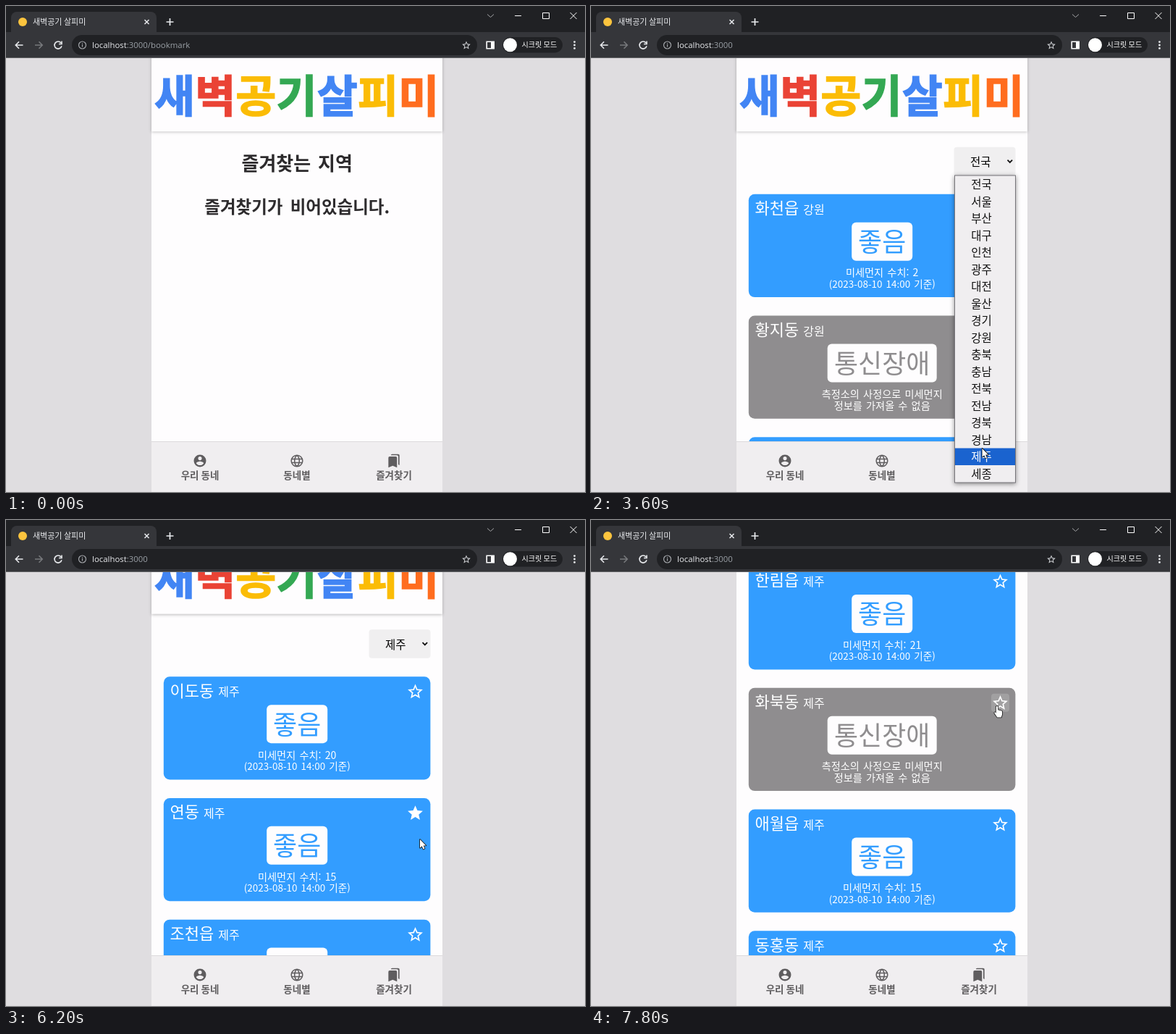
An HTML page with a canvas for the animation above (8 s loop, 800 by 671 pixels).

```html
<!DOCTYPE html>
<html lang="ko">
<head>
<meta charset="utf-8">
<title>새벽공기 살피미</title>
<style>
html, body { margin: 0; width: 100%; height: 100%; overflow: hidden; background: #dfdde0; }
canvas { display: block; width: 100vw; height: 100vh; }
</style>
</head>
<body>
<canvas id="stage" width="800" height="671"></canvas>
<script>
const ctx = document.getElementById('stage').getContext('2d');
const LOOP = 8000, STEP = 100;
const KR = '"Noto Sans CJK KR", "Noto Sans CJK", sans-serif';
const UI = '"Open Sans", "Noto Sans", sans-serif';
const BLUE = '#339dff', GREY = '#8f8d8f', WHITE = '#fefdfe', DARK = '#202124', BAR = '#35363a', LIGHT = '#e8eaed';
const COLUMN = { x: 201, w: 402, mid: 402.2 };
const CARD = { x: 217.8, y: 259.8, w: 368.6, h: 142.3, gap: 167.7 };
const MENU = { x: 503, y: 234.4, row: 23.5 };

const APP = '새벽공기 살피미';
const LOGO_COLORS = ['#4285f4', '#ea4335', '#fbbc05', '#34a853', '#4285f4', '#fbbc05', '#ff6d1f'];
const REGIONS = '전국 서울 부산 대구 인천 광주 대전 울산 경기 강원 충북 충남 전북 전남 경북 경남 제주 세종'.split(' ');
const ALL = [['화천읍', 2], ['황지동', null], ['중앙동', 5]];
const JEJU = [['이도동', 20], ['연동', 15], ['조천읍', 27], ['한림읍', 21], ['화북동', null], ['애월읍', 15], ['동홍동', 18]];
const NAV = [['person', '우리 동네'], ['globe', '동네별'], ['marks', '즐겨찾기']];
const navX = i => 268 + i * 134;

// Clicks, in ms
const SHOW_LIST = 800, OPEN_MENU = 2400, PICK = 4000, MARK = 5300;
// Pointer moves: start, duration, then where to
const MOVES = [
  [100, 500, 407, 640], [1500, 600, 515, 243], [2200, 500, 525, 231], [2700, 800, 540, 607],
  [3500, 300, 542, 622], [4800, 500, 562, 441], [5400, 100, 572, 441],
  [6200, 300, 574, 448], [6500, 900, 561, 257]
];

const ICON = {
  starEdge: 'M22 9.24l-7.19-.62L12 2 9.19 8.63 2 9.24l5.46 4.73L5.82 21 12 17.27 18.18 21l-1.63-7.03zM12 15.4l-3.76 2.27 1-4.28-3.32-2.88 4.38-.38L12 6.1l1.71 4.04 4.38.38-3.32 2.88 1 4.28z',
  star: 'M12 17.27L18.18 21l-1.63-7.03L22 9.24l-7.19-.62L12 2 9.19 8.63 2 9.24l5.46 4.73L5.82 21z',
  person: 'M12 2a10 10 0 100 20 10 10 0 000-20zM12 5a3 3 0 110 6 3 3 0 010-6zM12 19.2c-2.5 0-4.7-1.3-6-3.2 0-2 4-3.1 6-3.1s6 1.1 6 3.1c-1.3 1.9-3.5 3.2-6 3.2z',
  marks: 'M19 18l2 1V3a2 2 0 00-2-2H9a2 2 0 00-2 2h10a2 2 0 012 2zM15 5H5a2 2 0 00-2 2v16l7-3 7 3V7a2 2 0 00-2-2z',
  globe: 'M12 2.8a9.2 9.2 0 100 18.4 9.2 9.2 0 000-18.4zM12 2.8c-5.2 5-5.2 13.4 0 18.4M12 2.8c5.2 5 5.2 13.4 0 18.4M3.6 9h16.8M3.6 15h16.8',
  hand: 'M-1.3 10V1.2a1.3 1.3 0 012.6 0V5.3l4.4 1a1.7 1.7 0 011.4 1.7v3.4l-1.3 4H.3L-3.6 9.7a1 1 0 011.5-1.2z',
  arrow: 'M0 0V11.8l2.7-2.5 1.8 4.2 2-.9-1.8-4.1h3.6z'
};
for (const k in ICON) ICON[k] = new Path2D(ICON[k]);

const progress = (t, start, length) => Math.min(1, Math.max(0, (t - start) / length));
const inside = (p, x, y, w, h) => p.x >= x && p.x <= x + w && p.y >= y && p.y <= y + h;
const menuOpen = t => t >= OPEN_MENU && t < PICK;
const cardsAt = t => t < SHOW_LIST ? [] : t < PICK ? ALL : JEJU;
const cardY = i => CARD.y + i * CARD.gap;

function pointerAt(t) {
  let x = 424, y = 680;
  for (const [start, length, toX, toY] of MOVES) {
    const u = progress(t, start, length), e = u * u * (3 - 2 * u);
    x += (toX - x) * e;
    y += (toY - y) * e;
  }
  return { x, y };
}

// Wheel scroll: quick start, long glide
const scrollAt = t => 698.8 * (1 - (1 - progress(t, 6100, 900) ** 2.16) ** 7.38);

function navAt(t) {
  const p = pointerAt(t);
  return menuOpen(t) ? -1 : NAV.findIndex((_, i) => inside(p, navX(i) - 40, 612, 80, 59));
}

function starAt(t) {
  const p = pointerAt(t), scroll = scrollAt(t);
  return cardsAt(t).findIndex((_, i) => inside(p, 553, cardY(i) + 8 - scroll, 25, 25));
}

function rect(x, y, w, h, color, r = 0) {
  ctx.fillStyle = color;
  ctx.beginPath();
  ctx.roundRect(x, y, w, h, r);
  ctx.fill();
}

function dot(x, y, r, color) {
  ctx.fillStyle = color;
  ctx.beginPath();
  ctx.arc(x, y, r, 0, 7);
  ctx.fill();
}

// Text centred vertically on cy; returns its width
function text(s, x, cy, size, color, { align = 'left', weight = 400, font = KR, gap = 0 } = {}) {
  ctx.font = `${weight} ${size}px ${font}`;
  ctx.wordSpacing = gap + 'px';
  ctx.textAlign = align;
  ctx.fillStyle = color;
  ctx.fillText(s, x, cy + size * 0.38);
  return ctx.measureText(s).width;
}

function line(d, color, width = 1.4) {
  ctx.strokeStyle = color;
  ctx.lineWidth = width;
  ctx.stroke(new Path2D(d));
}

function icon(name, cx, cy, size, color, outlined) {
  ctx.save();
  ctx.translate(cx - size / 2, cy - size / 2);
  ctx.scale(size / 24, size / 24);
  ctx.fillStyle = ctx.strokeStyle = color;
  ctx.lineWidth = 1.8;
  if (outlined) ctx.stroke(ICON[name]);
  else ctx.fill(ICON[name], 'evenodd');
  ctx.restore();
}

function shadow(blur, alpha, dy = 0) {
  ctx.shadowColor = `rgba(0,0,0,${alpha})`;
  ctx.shadowBlur = blur;
  ctx.shadowOffsetY = dy;
}

function drawBrowser(t) {
  rect(0, 0, 800, 36, DARK);
  rect(7, 8, 201, 30, BAR, [8, 8, 0, 0]);
  rect(0, 36, 800, 36, BAR);
  rect(0, 71, 800, 1, '#66676a');
  dot(23, 22, 6, '#fcc43e');
  text(APP, 37, 21.5, 11, LIGHT, { weight: 500 });
  line('M191.5 19l6 6m0-6l-6 6', LIGHT, 1.5);
  line('M221.5 22h10m-5-5v10', LIGHT, 1.7);
  line('M665 11.5l4.5 4 4.5-4', '#a5a6a8', 1);
  line('M703 13.5h9M741.5 9.5h9v8h-9zM779.5 9l9 9m0-9l-9 9', '#fff', 1);

  line('M23.5 54h-10m4.5-4.7l-4.7 4.7 4.7 4.7', LIGHT, 1.6);
  line('M40 54h10m-4.5-4.7l4.7 4.7-4.7 4.7', '#77797c', 1.6);
  line('M76 51a5 5 0 10.9 4.2M77 48.5v4h-4', LIGHT, 1.6);
  rect(91, 40, 560, 28, DARK, 14);
  line('M110.5 54a5 5 0 11-10 0a5 5 0 0110 0M105.5 53.3v3.2M105.5 51.2v1.2', '#a5a8ac', 1.2);
  const url = { font: UI };
  const w = text('localhost', 119, 54, 11.4, LIGHT, url);
  text(':3000' + (t < SHOW_LIST ? '/bookmark' : ''), 119 + w, 54, 11.4, '#9aa0a6', url);
  icon('starEdge', 636, 54.3, 14, '#d5d7da');
  line('M664.2 49.2h10v9.6h-10z', '#fff', 1.6);
  rect(670, 49, 4.5, 10, '#fff');
  rect(686, 43, 83, 21.5, DARK, 11);
  dot(696.5, 53.7, 9.5, '#fff');
  text('시크릿 모드', 712.5, 53.3, 10.1, '#fff');
  for (let i = -1; i < 2; i++) dot(785.5, 54 + i * 4.4, 1.4, LIGHT);
}

function drawHeader() {
  ctx.save();
  shadow(4, 0.25, 1);
  rect(COLUMN.x, 60, COLUMN.w, 113.3, WHITE);
  ctx.restore();
  [...APP.replace(' ', '')].forEach((ch, i) => {
    const x = 233 + i * 56.2, color = LOGO_COLORS[i];
    text(ch, x, 123.5, 61, color, { align: 'center', weight: 900 });
    ctx.strokeStyle = color;
    ctx.lineWidth = 1.5;
    ctx.strokeText(ch, x, 123.5 + 61 * 0.38);
  });
}

function drawSelect(label) {
  rect(501.5, 194.8, 85, 39.5, '#f0eff0', 4);
  text(label, 524, 215.5, 15.5, '#000');
  line('M575.5 212.7l3.3 3.3 3.3-3.3', '#111', 1.8);
}

function drawCard([name, value], region, y, starred, hovered) {
  const down = value === null, color = down ? GREY : BLUE, mid = COLUMN.mid;
  const center = { align: 'center', gap: 2 };
  rect(CARD.x, y, CARD.w, CARD.h, color, 8.4);
  const w = text(name, 226.5, y + 19, 22, '#fff');
  text(region, 226.5 + w + 6, y + 21, 16, '#fff');
  const badge = down ? 151 : 84;
  rect(mid - badge / 2, y + 38.9, badge, 53, WHITE, 6);
  text(down ? '통신장애' : '좋음', mid, y + 65.7, 36, color, center);
  text(down ? '측정소의 사정으로 미세먼지' : '미세먼지 수치: ' + value, mid, y + 108.2, 14.2, '#fff', center);
  text(down ? '정보를 가져올 수 없음' : '(2023-08-10 14:00 기준)', mid, y + 124, down ? 14.2 : 13.5, '#fff', center);
  if (hovered) rect(553, y + 8, 25, 25, 'rgba(255,255,255,.17)', 4);
  icon(starred ? 'star' : 'starEdge', 565.5, y + 20.7, 25, '#fff');
}

function drawPage(t) {
  const jeju = t >= PICK, hover = starAt(t);
  ctx.save();
  ctx.beginPath();
  ctx.rect(0, 72, 800, 599);
  ctx.clip();
  rect(0, 72, 800, 599, '#dfdde0');
  rect(COLUMN.x, 60, COLUMN.w, 630, WHITE);
  ctx.translate(0, -scrollAt(t));
  drawHeader();
  if (t < SHOW_LIST) {
    text('즐겨찾는 지역', COLUMN.mid, 217, 26, '#2d2b2d', { align: 'center', weight: 900, gap: 4 });
    text('즐겨찾기가 비어있습니다.', COLUMN.mid, 277, 23.5, '#2d2b2d', { align: 'center', weight: 700, gap: 5 });
  } else {
    drawSelect(jeju ? '제주' : '전국');
    cardsAt(t).forEach((card, i) =>
      drawCard(card, jeju ? '제주' : '강원', cardY(i), t >= MARK && i === 1, i === hover));
  }
  ctx.restore();
}

function drawNav(t) {
  const hover = navAt(t);
  rect(COLUMN.x, 601, COLUMN.w, 70, '#f0eef0');
  rect(COLUMN.x, 601, COLUMN.w, 1, '#dcdadc');
  NAV.forEach(([name, label], i) => {
    const color = i === hover ? '#1d1b1d' : '#5f5d5f';
    icon(name, navX(i), 628, 20.4, color, name === 'globe');
    text(label, navX(i), 648, 13.5, color, { align: 'center', weight: i === hover ? 900 : 700 });
  });
}

// The link bubble fades with the share of recent steps spent on a link
function drawStatus(t) {
  const recent = Array.from({ length: 6 }, (_, i) => navAt(t - i * STEP)).filter(i => i >= 0);
  if (!recent.length) return;
  const marks = recent[0] === 2;
  ctx.save();
  ctx.globalAlpha = recent.length / 6;
  rect(0, 655, marks ? 125 : 266.5, 16, DARK, [0, 3, 0, 0]);
  text('localhost:3000' + (marks ? '/bookmark' : ''), 3.5, 663.7, 9.9, LIGHT, { font: UI });
  ctx.restore();
}

function drawMenu(t) {
  if (!menuOpen(t)) return;
  const { x, y, row } = MENU, h = REGIONS.length * row;
  const active = Math.max(0, Math.floor((pointerAt(t).y - y) / row));
  ctx.save();
  ctx.globalAlpha = progress(t, OPEN_MENU - STEP, 2 * STEP);
  shadow(6, 0.45, 2);
  rect(x - 1, y - 1, 85, h + 2, '#77757a');
  shadow(0, 0);
  rect(x, y, 83, h, '#f0eef0');
  REGIONS.forEach((name, i) => {
    const top = y + i * row;
    if (i === active) rect(x, top, 83, row, '#1a63cf');
    text(name, 525.3, top + row / 2, 15.5, i === active ? '#fff' : '#111');
  });
  ctx.restore();
}

function drawPointer(t) {
  const p = pointerAt(t);
  const onSelect = t >= SHOW_LIST && inside(p, 501, 195 - scrollAt(t), 86, 39);
  const shape = ICON[onSelect || navAt(t) >= 0 || starAt(t) >= 0 ? 'hand' : 'arrow'];
  ctx.save();
  ctx.translate(p.x, p.y);
  ctx.lineJoin = 'round';
  ctx.strokeStyle = '#111';
  ctx.lineWidth = 1.6;
  ctx.stroke(shape);
  ctx.fillStyle = '#fff';
  ctx.fill(shape);
  ctx.restore();
}

const start = performance.now();
function tick() {
  const t = Math.floor(((performance.now() - start) % LOOP) / STEP) * STEP;
  for (const draw of [drawPage, drawNav, drawBrowser, drawStatus, drawMenu, drawPointer]) draw(t);
  requestAnimationFrame(tick);
}
tick();
</script>
</body>
</html>
```
